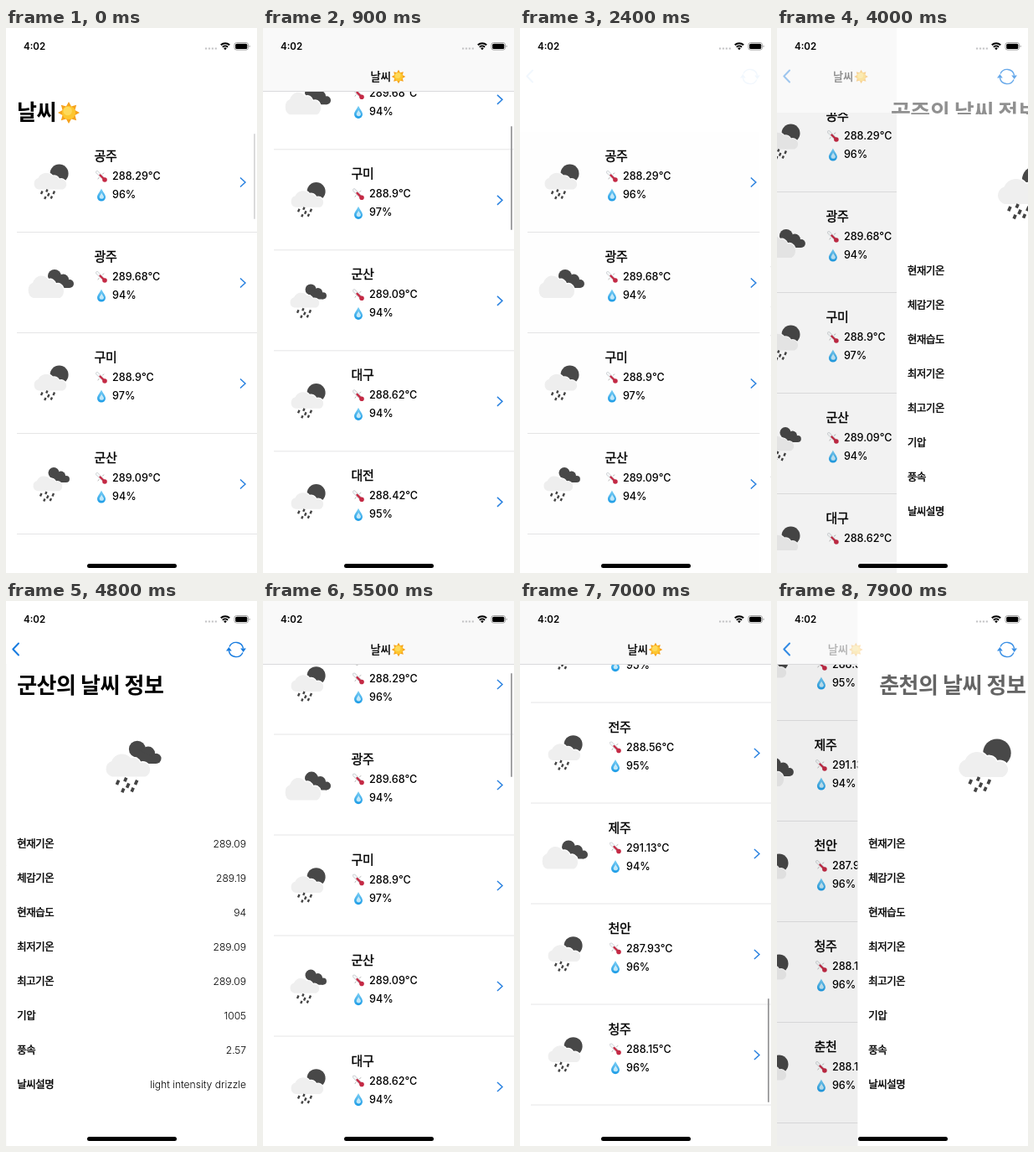
Write an HTML page that moves like this. It is 300 px wide and 650 px high and loops after 8 s.

```html
<!DOCTYPE html>
<html lang="ko">
<head>
<meta charset="utf-8">
<title>날씨</title>
<style>
html, body { margin: 0; width: 100%; height: 100%; overflow: hidden; background: #fff; }
body { font-family: Inter, "Noto Sans CJK KR", "Noto Sans CJK", sans-serif; color: #000; }
div, svg { position: absolute; }
svg { overflow: visible; left: 0; top: 0; width: 1px; height: 1px; }
#stage { left: 0; top: 0; width: 300px; height: 650px; overflow: hidden; background: #fff; }
.t { white-space: pre; line-height: 20px; height: 20px; }
.city, .label, .small { font-weight: 400; -webkit-text-stroke: .4px #000; }
.city { font-size: 15px; letter-spacing: -.3px; }
.label { font-size: 12.4px; letter-spacing: -.4px; }
.small { font-size: 13.2px; }
.num { font-size: 12.6px; font-weight: 500; }
.big { font-size: 26px; font-weight: 700; letter-spacing: -.5px; }
.value { font-size: 12.2px; font-weight: 300; letter-spacing: -.05px; right: 13px; }
#list { left: 0; top: 0; width: 300px; height: 623px; overflow: hidden; }
.row { left: 0; width: 300px; height: 120px; }
.row::before { content: ""; position: absolute; left: 13px; right: 0; top: 0; height: 1px; background: #e5e5e6; }
#dim, #pane { left: 0; top: 0; width: 300px; height: 650px; }
#dim { background: #000; }
#pane { background: #fff; }
#bar { left: 0; top: 0; width: 300px; }
#line { left: 0; bottom: 0; width: 300px; height: 1px; background: #dadadc; }
#largeBox { left: 0; top: 72px; width: 300px; height: 52px; overflow: hidden; }
#titleBox { left: 0; top: 0; width: 300px; overflow: hidden; }
#thumb { left: 295.5px; width: 2.5px; border-radius: 2px; background: #a2a2a4; }
#home { left: 96.5px; top: 639.4px; width: 107px; height: 4.4px; border-radius: 3px; background: #000; }
</style>
</head>
<body>
<svg>
  <defs>
    <linearGradient id="water" x1="0" y1="0" x2="0" y2="1">
      <stop offset="0" stop-color="#7fd0f5"/><stop offset="1" stop-color="#1a9be6"/>
    </linearGradient>
    <path id="cloud" fill="#efefef" stroke="#fff" stroke-width="2" paint-order="stroke"
      d="M-14 8.5A7 7 0 0 1-14.5-5A10 10 0 0 1 2.5-7.5A6.5 6.5 0 0 1 10.5-3.5A6.2 6.2 0 0 1 15 8.5Z"/>
    <path id="rain" fill="none" stroke="#444" stroke-width="2.4"
      d="M-9.5 10.5l-1.5 3.5M-3.5 8.5l-1.3 3M-1.5 13l-1.5 3.5M5 10.5l-1.5 3.5M-5.5 17l-1.3 3M2 16.5l-1.3 3"/>
    <g id="puffs" fill="#484848">
      <circle cx="5" cy="-9" r="8"/><circle cx="15.5" cy="-5" r="6.5"/><circle cx="23" cy="0" r="5"/>
      <path d="M5-9L23 0V5H5Z"/>
    </g>
    <g id="shower"><circle cx="10.6" cy="-10.4" r="11" fill="#484848"/><use href="#cloud"/><use href="#rain"/></g>
    <g id="cloudy" transform="translate(0 1)">
      <use href="#puffs"/><use href="#cloud" transform="translate(-5 5.5) scale(1.1 1.35)"/>
    </g>
    <g id="drizzle">
      <use href="#puffs" transform="translate(0 -6) scale(.82)"/>
      <use href="#cloud" transform="translate(-3 .5) scale(.9)"/><use href="#rain" transform="translate(-1 .5)"/>
    </g>
    <g id="heat" stroke-linecap="round">
      <path d="M-5-5L3.5 3.5" stroke="#c3c8cc" stroke-width="3.8"/>
      <path d="M-5-5L3.5 3.5" stroke="#f4f6f7" stroke-width="2.6"/>
      <path d="M-1.5-1.5L4 4" stroke="#c42a45" stroke-width="2.4"/>
      <circle cx="4" cy="4" r="2.8" fill="#c42a45"/>
      <path d="M1.5-3l1.5-1M-3 1.5l-1 1.5" stroke="#999" stroke-width=".7"/>
    </g>
    <g id="drop">
      <path d="M0-7.5C1.5-4 5-.5 5 2.8A5 4.8 0 0 1-5 2.8C-5-.5-1.5-4 0-7.5Z" fill="url(#water)"/>
      <path d="M.2-2.5C1-.5 3 1 3 3A2.9 2.9 0 0 1-2.4 3C-2.4 1-.6-.5.2-2.5Z" fill="#d8f2fc" opacity=".85"/>
    </g>
    <g id="sun"><path id="rays" fill="#f6a21c"/><circle r=".62" fill="#fdc62f"/><circle cx="-.1" cy="-.15" r=".4" fill="#fed95a"/></g>
  </defs>
</svg>
<div id="stage">
  <div id="list"><div id="rows"></div></div>
  <div id="dim"></div>
  <div id="bar"><div id="line"></div></div>
  <div id="largeBox">
    <div id="large" style="left:13px">
      <div class="t big" style="top:19px">날씨</div>
      <svg><use href="#sun" transform="translate(62 29) scale(13)"/></svg>
    </div>
  </div>
  <div id="thumb"></div>
  <div id="pane"></div>
  <div id="inline">
    <div class="t small" style="left:128.5px;top:48px">날씨</div>
    <svg><use href="#sun" transform="translate(162 58) scale(8.3)"/></svg>
  </div>
  <div id="titleBox"><div id="title" class="t big" style="top:91px"></div></div>
  <svg id="back"><path d="M15 50.5L8.3 57.5L15 64.5" fill="none" stroke="#187ce0" stroke-width="2" stroke-linecap="round" stroke-linejoin="round"/></svg>
  <svg id="refresh" fill="#187ce0">
    <path d="M267 54.5A8.8 8.8 0 0 1 283.6 56.5M283 61.5A8.8 8.8 0 0 1 266.4 59.5" fill="none" stroke="#187ce0" stroke-width="1.4"/>
    <path d="M280.2 56.5H287L283.6 61ZM263 59.5H269.8L266.4 55Z"/>
  </svg>
  <div class="t" style="left:21px;top:12px;font-size:11.5px;font-weight:600">4:02</div>
  <svg>
    <path d="M238 24.5h14" stroke="#c4c4c6" stroke-width="2" stroke-dasharray="2.2 1.7"/>
    <g fill="none" stroke="#000" stroke-width="2">
      <path d="M256.8 20.3A7.5 7.5 0 0 1 267.2 20.3M258.9 22.7A4.6 4.6 0 0 1 265.1 22.7"/>
    </g>
    <path d="M260.2 24.2A2.6 2.6 0 0 1 263.8 24.2L262 26.2Z"/>
    <rect x="273" y="17.5" width="16.5" height="8.6" rx="2.5" fill="none" stroke="#999" stroke-width=".9"/>
    <rect x="274.2" y="18.7" width="14.1" height="6.2" rx="1.5"/>
    <path d="M290.6 20.4v2.8q1.2-.5 1.2-1.4t-1.2-1.4" fill="#999"/>
  </svg>
  <div id="home"></div>
</div>
<script>
const $ = id => document.getElementById(id);
const clamp = v => Math.max(0, Math.min(1, v));

$('rays').setAttribute('d', 'M' + Array.from({length: 16}, (_, i) => {
  const r = i % 2 ? .62 : 1, a = i * Math.PI / 8;
  return (r * Math.sin(a)).toFixed(3) + ' ' + (-r * Math.cos(a)).toFixed(3);
}).join('L') + 'Z');

// city, temperature, humidity, icon (default: shower)
const cities = `공주 288.29 96|광주 289.68 94 cloudy|구미 288.9 97|군산 289.09 94 drizzle|대구 288.62 94
|대전 288.42 95|목포 290.16 92 cloudy|부산 290.03 90|서산 288.58 93|서울 287.81 88|속초 287.49 94
|수원 287.85 94|서천 290.26 91 cloudy|울산 289.14 93|익산 288.74 95|전주 288.56 95|제주 291.13 94 cloudy
|천안 287.93 96|청주 288.15 96|춘천 288.12 96`.split('|').map(s => s.trim().split(' '));
const labels = ['현재기온', '체감기온', '현재습도', '최저기온', '최고기온', '기압', '풍속', '날씨설명'];
const sky = {shower: 'light rain', cloudy: 'overcast clouds', drizzle: 'light intensity drizzle'};

const text = (cls, x, y, s) =>
  `<div class="t ${cls}" style="${x === null ? '' : `left:${x}px;`}top:${y - 10}px">${s}</div>`;
const icon = (id, x, y, k = 1) => `<use href="#${id}" transform="translate(${x} ${y}) scale(${k})"/>`;

$('rows').innerHTML = cities.map(([name, temp, wet, kind = 'shower'], i) =>
  `<div class="row" style="top:${123 + i * 120}px">` +
  text('city', 105.5, 30, name) + text('num', 127, 54, temp + '°C') + text('num', 127, 76, wet + '%') +
  `<svg>${icon(kind, 53, 61)}${icon('heat', 114, 54)}${icon('drop', 114, 76)}
   <path d="M280 55.5L286 61L280 66.5" fill="none" stroke="#2a82e0" stroke-width="1.5"/></svg></div>`
).join('') + `<div class="row" style="top:${123 + cities.length * 120}px"></div>`;

let shown = -1;
function showCity(i) {
  if (i === shown) return;
  shown = i;
  const [name, temp, wet, kind = 'shower'] = cities[i];
  const values = [temp, (+temp + .1).toFixed(2), wet, temp, temp, '1005', '2.57', sky[kind]];
  $('title').textContent = name + '의 날씨 정보';
  $('pane').innerHTML = `<svg>${icon(kind, 150.5, 197, 1.52)}</svg>` + labels.map((l, k) =>
    text('label', 13, 290 + 41 * k, l) + text('value', null, 290 + 41 * k, values[k])).join('');
}

// cubic-bezier(.38, .7, .125, 1)
function glide(u) {
  if (u <= 0 || u >= 1) return clamp(u);
  const bez = (a, b, s) => 3 * (1 - s) ** 2 * s * a + 3 * (1 - s) * s * s * b + s ** 3;
  let lo = 0, hi = 1;
  for (let k = 0; k < 24; k++) {
    const mid = (lo + hi) / 2;
    if (bez(.38, .125, mid) < u) lo = mid; else hi = mid;
  }
  return bez(.7, 1, lo);
}

// start time, push (1) or pop (0), city
const moves = [[2389, 1, 0], [3900, 0, 0], [4330, 1, 3], [5000, 0, 3], [7764, 1, 19]];
// start, end, from, to, power of the slowing curve
const scrolls = [[450, 1200, 0, 260, 2], [1250, 2200, 260, 0, 1.85], [2900, 2901, 48, 48, 1], [5482, 7500, 48, 1901, 2.1]];

function scrollAt(t) {
  const s = scrolls.filter(s => t >= s[0]).pop();
  if (!s) return 0;
  const [a, b, from, to, n] = s;
  return to + (from - to) * (1 - clamp((t - a) / (b - a))) ** n;
}

function thumbAlpha(t) {
  if (t < 450) return .4;
  if (t < 2900) return clamp((2400 - t) / 200);
  return t < 5482 ? 0 : clamp((7740 - t) / 200);
}

function draw(t) {
  const [start, push, city] = moves.filter(m => t >= m[0]).pop() || [-1000, 0, 0];
  const g = glide((t - start) / 500), p = push ? g : 1 - g;   // p: how far the detail page is in
  const o = scrollAt(t), folded = clamp(o / 48);
  const base = 124 - 48 * folded;
  const barEnd = push ? base : base + (124 - base) * p;
  const x = 300 * (1 - p);

  showCity(city);
  $('list').style.transform = `translateX(${-.3 * (300 - x)}px)`;
  $('rows').style.transform = `translateY(${-o}px)`;
  $('dim').style.opacity = .1 * p;
  $('bar').style.height = barEnd + 'px';
  $('bar').style.background = `rgb(${Array(3).fill(255 - 6 * folded)})`;
  $('line').style.opacity = folded < 1 || (!push && p > 0) ? 0 : 1;
  $('largeBox').style.opacity = p > 0 ? 0 : 1;
  $('large').style.transform = `translateY(${-o}px)`;

  $('thumb').style.top = (o > 48 ? 78 + (o - 48) * .2256 : 126 - o) + 'px';
  $('thumb').style.height = 102 + 22 * folded + 'px';
  $('thumb').style.opacity = thumbAlpha(t);

  $('pane').style.transform = `translateX(${x}px)`;
  $('inline').style.transform = `translateX(${-71 * (1 - (1 - p) ** 2.7)}px)`;
  $('inline').style.opacity = clamp((o - 20) / 28) * (1 - p) ** 1.1;
  $('titleBox').style.height = (push || p === 1 ? 130 : barEnd + 2) + 'px';
  $('title').style.left = 13 + (push ? 340 : 258) * (1 - p) + 'px';
  $('title').style.opacity = p ** 1.3;
  $('back').style.opacity = push ? clamp(p * 1.3) : p ** 1.4;
  const tap = t >= 3200 && t < 3600 ? .3 + .7 * (t - 3200) / 400 : 1;
  $('refresh').style.opacity = clamp(p * 1.25) * tap;
}

function tick() {
  draw(performance.now() % 8000);
  requestAnimationFrame(tick);
}
tick();
</script>
</body>
</html>
```
